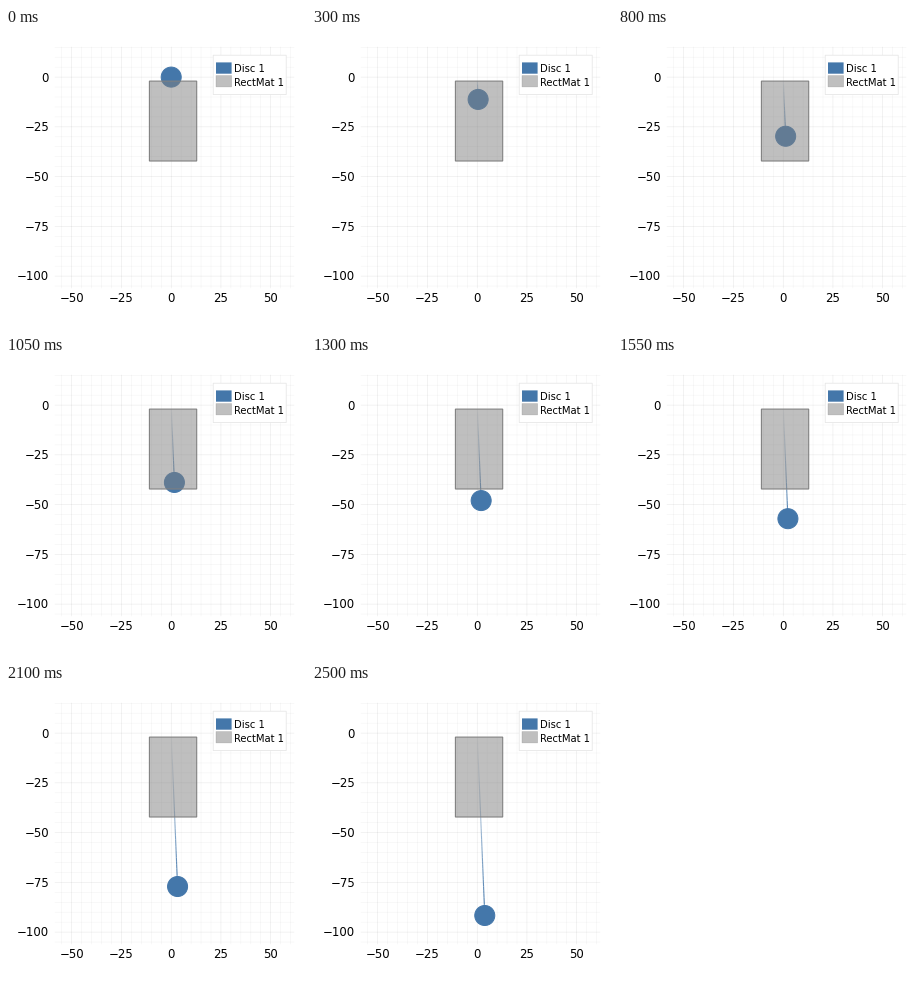
Write a matplotlib script that moves like this. It is 300 px wide and 300 px high and loops after 2550 ms.

```python
import numpy as np
import matplotlib.pyplot as plt
from matplotlib.animation import FuncAnimation
from matplotlib.collections import LineCollection
from matplotlib.colors import to_rgb
from matplotlib.patches import Circle, Rectangle

SIZE, DPI = 300, 100
FRAMES, INTERVAL = 51, 50
X0, Y0, SCALE = 165.2, 49.1, 1.99      # pixel of the data origin, pixels per unit
LEFT, RIGHT, TOP, BOTTOM = 49, 288, 19, 260
SPEED, END_SPEED, MAT_TIME = 1.88, 1.82, 22   # units per frame, frames on the mat
DRIFT = 0.0415                         # sideways motion per unit of fall
BLUE, GRAY = "#4477AA", "#808080"
PX = 72 / DPI                          # one pixel in points

plt.rcParams["font.family"] = "DejaVu Sans"
fig = plt.figure(figsize=(SIZE / DPI, SIZE / DPI), dpi=DPI, facecolor="white")
ax = fig.add_axes([0, 0, 1, 1])
ax.set_xlim(0, SIZE)
ax.set_ylim(SIZE, 0)
ax.axis("off")


def to_px(x, y):
    return X0 + SCALE * x, Y0 - SCALE * y


def label(x, y, text, size, ha):
    ax.text(x, y, text, fontsize=size * PX, ha=ha, va="baseline", color="black", zorder=8)


def tick(x, y, value, ha):
    label(x, y, str(value).replace("-", "\u2212"), 11.8, ha)


def box(x, y, w, h, face, edge, lw, zorder):
    ax.add_patch(Rectangle((x, y), w, h, fc=face, ec=edge, lw=lw * PX,
                           snap=False, zorder=zorder))


def grid_line(xs, ys, value):
    alpha = 0.1 if value % 25 == 0 else 0.05
    ax.plot(xs, ys, color="black", alpha=alpha, lw=0.5 * PX, snap=False, zorder=1)


def fall(t):
    """Distance fallen: friction slows the disc while it is on the mat."""
    on_mat = np.minimum(t, MAT_TIME)
    slowing = (SPEED - END_SPEED) / MAT_TIME
    return SPEED * on_mat - slowing * on_mat ** 2 / 2 + END_SPEED * (t - on_mat)


# Grid and tick labels
for v in range(-55, 61, 5):
    x = to_px(v, 0)[0]
    grid_line([x, x], [TOP, BOTTOM], v)
for v in range(-105, 16, 5):
    y = to_px(0, v)[1]
    grid_line([LEFT, RIGHT], [y, y], v)
for v in range(-50, 51, 25):
    tick(to_px(v, 0)[0], 274.5, v, "center")
for v in range(-100, 1, 25):
    tick(43, to_px(0, v)[1] + 4.4, v, "right")

# Moving disc with its fading trail, both below the mat
trail = LineCollection([], linewidths=1.1 * PX, zorder=2)
ax.add_collection(trail, autolim=False)
disc = Circle((X0, Y0), 10, fc=BLUE, ec=BLUE, lw=1 * PX, zorder=3)
ax.add_patch(disc)

box(143.4, 53.1, 47.3, 79.9, (*to_rgb(GRAY), 0.5), GRAY, 1.1, 4)

# Legend
box(207.2, 27.2, 73, 39.4, "white", "#e6e6e6", 0.8, 6)
box(210, 34.4, 15.6, 11.3, BLUE, "none", 0, 7)
box(210, 47.6, 15.6, 11.3, (*to_rgb(GRAY), 0.5), (*to_rgb(GRAY), 0.4), 0.6, 7)
label(227.9, 44.4, "Disc 1", 10, "left")
label(227.9, 57.6, "RectMat 1", 10, "left")


def update(i):
    depth = fall(np.arange(i + 1))
    points = np.column_stack(to_px(DRIFT * depth, -depth))
    disc.center = tuple(points[-1])
    trail.set_segments(list(np.stack([points[:-1], points[1:]], axis=1)))
    trail.set_color([(*to_rgb(BLUE), a) for a in np.linspace(0, 1, i)])
    return trail, disc


anim = FuncAnimation(fig, update, frames=FRAMES, interval=INTERVAL,
                     init_func=lambda: update(0), repeat=True, repeat_delay=0)
plt.show()
```
